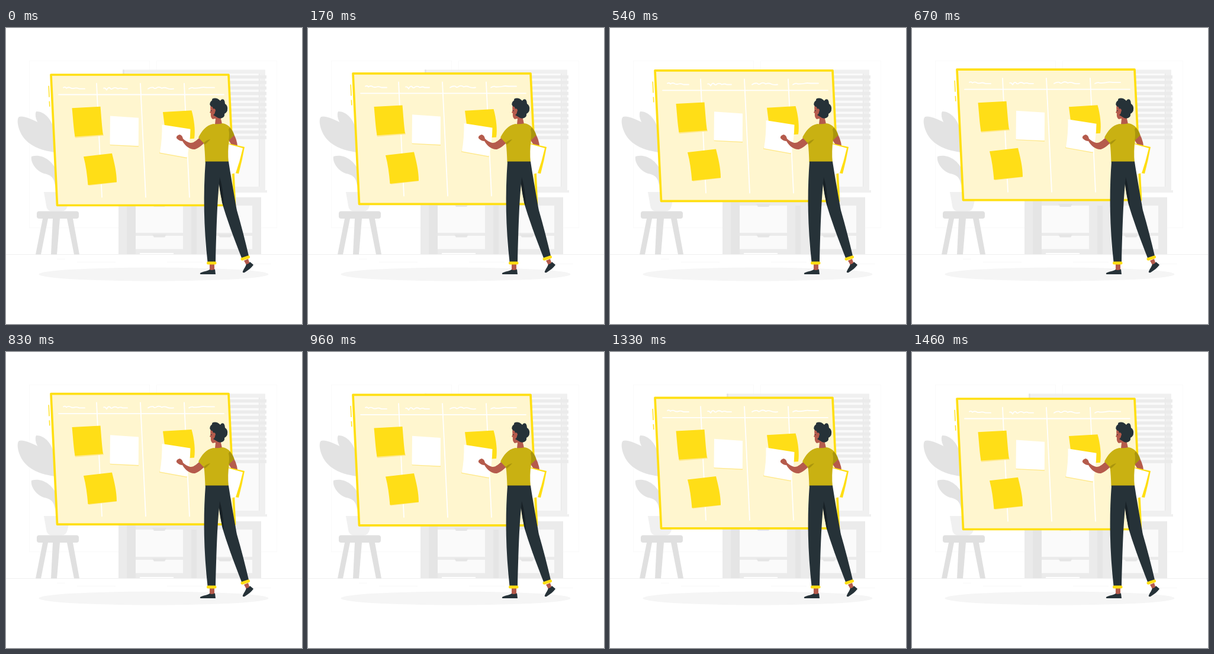
Animation, 500 px wide and 500 px high, one loop 1.5 s. Source, as an HTML page:

```html
<!DOCTYPE html>
<html lang="en">
<head>
<meta charset="utf-8">
<title>Planning board</title>
<style>
  html, body { margin: 0; width: 100%; height: 100%; overflow: hidden; background: #fff; }
  svg { display: block; width: 100%; height: 100%; }
</style>
</head>
<body>
<svg viewBox="0 0 500 500">
  <!-- wall, window and blinds -->
  <g fill="none" stroke="#fafafa">
    <rect x="39.5" y="55.5" width="203" height="282"/>
    <rect x="254.500" y="55.5" width="203" height="282"/>
  </g>
  <path fill="#f0f0f0" d="M197 70.500H438V275H197Z"/>
  <path fill="#e6e6e6" d="M197 70.500h3v8h-3ZM426.500 77h1.500v191h-1.500Z"/>
  <path fill="#fafafa" d="M208 77H427V268H208Z"/>
  <path fill="#f0f0f0" d="M194 274H441V278H194Z"/>
  <g id="blinds" fill="#ebebeb" opacity=".9"></g>

  <!-- cabinet -->
  <path fill="#ebebeb" d="M190 286H431V382H190Z"/>
  <path fill="#e5e5e5" d="M204 286h15v96h-15ZM313 300h9v82h-9Z"/>
  <path fill="#fafafa" d="M219 300h80v46h-80ZM219 351h80v22.500h-80ZM337 300h79v46h-79ZM337 351h79v22.500h-79Z"/>
  <path fill="#e5e5e5" d="M247 297h24l-3 5h-18ZM247 348.500h24l-3 5h-18ZM358 348.500h24l-3 5h-18Z"/>
  <path fill="#fff" d="M226 380h57v3h-57Z"/>

  <!-- floor -->
  <path stroke="#f0f0f0" d="M0 382.500H500"/>
  <path stroke="#f8f8f8" d="M86 390.500h14M120 395.500h65M272 395.500h60M403 398.500h45"/>
  <ellipse cx="249.500" cy="416" rx="194" ry="11.500" fill="#f5f5f5"/>

  <!-- plant and stool -->
  <g fill="#e0e0e0">
    <path d="M22 150C17 154 20 174 32 188C46 203 64 207 82 210V184C72 166 52 158 40 153Q28 148 22 150Z" fill="#e3e3e3"/>
    <path d="M51 141C48 146 51 158 57 164L82 200V176C79 157 66 140 51 141Z" fill="#e3e3e3"/>
    <path d="M43 217C41 227 51 242 65 246C78 249 81 254 83 266L85 240C77 223 60 212 43 217Z" fill="#e3e3e3"/>
    <path fill="#f0f0f0" d="M64 277H109L104 300Q102 309.500 94 309.500H77Q69 309 68 300Z"/>
    <rect x="52" y="309.500" width="71" height="12.500" rx="4"/>
    <path d="M62 322h9L59 382.500h-9ZM79 322h12L86 382.500H76ZM103 322h10L124 382.500h-9Z"/>
  </g>

  <!-- floating board -->
  <g id="board">
    <path d="M76 79.300H376L386.500 299.800H86.500Z" fill="#fff6cf" stroke="#ffdf12" stroke-width="3.700" stroke-linejoin="round"/>
    <path d="M72.200 98L73 117M73.300 124L73.800 133" stroke="#ffe227" stroke-width="1.500"/>
    <g fill="none" stroke="#fff" stroke-width="1.800" stroke-linecap="round" stroke-linejoin="round">
      <path d="M89 112.800H368M153 94L162 286M227 94L236 286M301 94L310 286"/>
      <path d="M97 101q3-2 5 1q4-3 8 0q3 1 6 0t8 1h9M165 102q3-1 5 3q3-6 6-3q2 3 5 0q4-2 8 1q5-2 8 0h8M240 103q5-3 9-2q2 3 6 0q4-2 8 1q5-2 9 0t11 1M309 103q5-3 8-1q8 0 12-1t10 0h13"/>
    </g>
    <g fill="#ffe98c">
      <path d="M116 182L164 179L165 182L117 186Z"/>
      <path d="M138 263L185 258L187 261L140 266.500Z"/>
      <path d="M175 196L224 198L224 201L176 198.500Z"/>
    </g>
    <g fill="#ffde17">
      <path d="M111.500 135.500L159.500 133C161 150 162 167 164 180.500L116.500 183.800C114 168 113 150 111.500 135.500Z"/>
      <path d="M131 217.500L179 212C183 228 187 244 187 260.500L138.500 265.500C137 248 135 232 131 217.500Z"/>
      <path d="M265 142.300L313.500 139.500C318 155 320 174 318 187L271 190Z"/>
    </g>
    <path fill="#fff" d="M176 148.800L224 152L223.800 199.500L175.500 197.300Z"/>
    <path fill="#ffe98c" d="M260 209L306 217L305.500 220.500L259 212Z"/>
    <path fill="#fff" d="M263.500 163.500L311.500 171Q311 198 305.500 219L260 210.800Q264 188 263.500 163.500Z"/>
  </g>

  <!-- person -->
  <g fill="#b55b4c">
    <path d="M375 188L385 180Q390 189 391 199L381 197Z"/>
    <path fill="#ffde12" d="M376 195L403 201Q399 224 393 246L387 245Z"/>
    <path fill="#fff" d="M375 196L400 203Q395 225 388 245L374 248Z"/>
    <path d="M330 183C322 189 317 195 311 194Q304 192 299 187Q298 181 293 180Q287 182 288 186Q292 191 298 191C303 200 312 206 319 205C326 203 332 197 338 191Z"/>
    <path d="M346 130C344 136 347 138 344 143L346 144Q345 151 349 154L354 153L353 163Q360 166 365 162L362 149L358 131Z"/>
    <path d="M344 399h8v11h-8ZM402 393L409 390L412 399L407 402Z"/>
  </g>
  <path fill="#c9b112" d="M350 162Q358 163 366 161C377 163 383 172 385.500 181L377 189Q374 208 376 227H336.500Q336 208 334.500 195L325 185C330 175 338 164 350 162Z"/>
  <path fill="#aa950d" d="M334 194Q339 189 345 188Q339 195 335 197ZM378 168Q384 175 385.500 181L376 190Q378 180 376 171Z"/>
  <g fill="#263238">
    <path d="M347 133Q342 129 346 124Q349 122 348 120Q355 116 362 123Q364 119 368 121Q370 124 370 128Q375 131 374 138Q374 142 369 145Q370 150 365 152Q360 154 355 150L350 147Q354 144 353 139Q352 135 350 137Q349 132 347 133Z"/>
    <path d="M337 225.500H376C379 246 386 285 390 308Q401 346 410.500 387L399 391C385 355 372 320 365 295L360 263C357 295 356 320 354 395H340.500C334 335 333 281 337 225.500Z"/>
    <path fill="#182126" d="M361 252Q367 271 368 302Q362 285 360 264Z"/>
    <path d="M328 414C333 411 340 411 344 408Q348 410 353 407.500L354 416H330Q327 416 328 414Z"/>
    <path d="M400 411C402 406 405 403 406 399Q410 399 412 395L418 400C415 405 409 409 403 413Q399 414 400 411Z"/>
  </g>
  <path fill="#b55b4c" d="M350 137Q353 135 354 139Q353 144 350 145Z"/>
  <path d="M346 139.500L348 140" stroke="#263238"/>
  <path d="M341.500 397H353M399 390.300L409.500 386.800" stroke="#ffde12" stroke-width="5" stroke-linecap="round"/>
</svg>
<script>
  const board = document.getElementById('board');
  const blinds = document.getElementById('blinds');
  const LOOP = 1500, STEPS = 36, LIFT = 10;

  blinds.innerHTML = Array.from({ length: 12 }, (_, i) =>
    `<rect x="205" y="${80 + i * 9.3}" width="235" height="5.500"/>`).join('');

  // Linear rise and fall, held at 24 poses per second
  function draw(now) {
    const step = Math.floor((now % LOOP + 4.9) / (LOOP / STEPS)) % STEPS;
    const phase = (step + 0.5) / STEPS;
    const lift = LIFT * (1 - Math.abs(2 * phase - 1));
    board.setAttribute('transform', `translate(0 ${-lift})`);
  }

  function tick() {
    draw(performance.now());
    requestAnimationFrame(tick);
  }
  tick();
</script>
</body>
</html>
```
